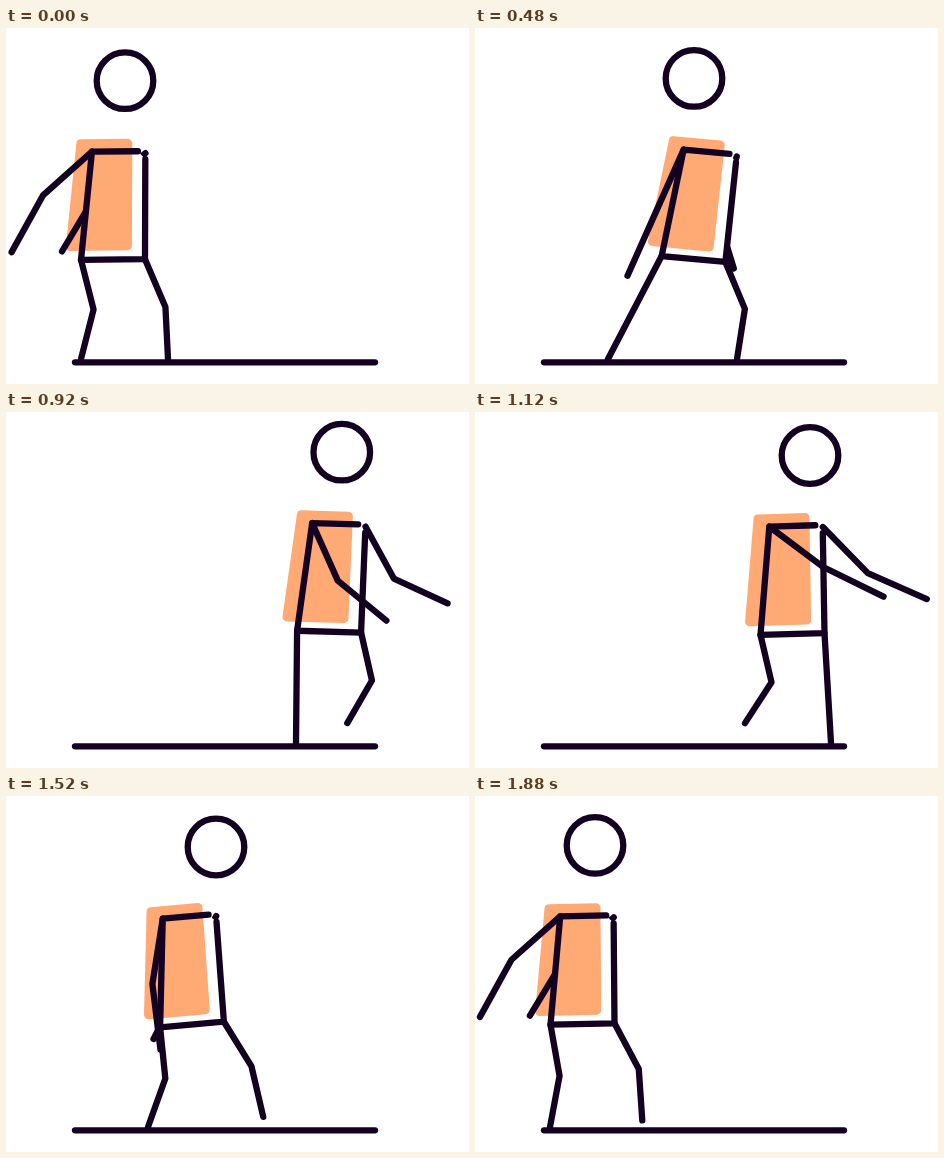
Recreate the animation shown at these times as an HTML page with a canvas. Size 463 by 356 pixels, loop 1.92 s.

```html
<!DOCTYPE html>
<html lang="en">
<head>
<meta charset="utf-8">
<title>Stick figure pacing</title>
<style>
html, body { margin: 0; height: 100%; overflow: hidden; background: #fff; }
canvas { display: block; }
</style>
</head>
<body>
<canvas id="stage" width="463" height="356"></canvas>
<script>
const ctx = document.getElementById('stage').getContext('2d');
const LOOP = 1920, STEP = 40, FLOOR = 331;
const INK = '#140121', ORANGE = '#ffa974';

// Keys: time, hip centre x, y, head offset x
const body = [
  [0, 107, 231.5, 12], [320, 133, 221.5, 6], [400, 172, 217.5, 3],
  [480, 218.5, 231, .5], [720, 310, 231.5, 8], [1020, 325, 215.5, 15],
  [1120, 317.5, 222, 17.5], [1520, 186, 228.5, 24], [1880, 107.5, 228, 12.5]
];
// Keys: time, swing in degrees from hanging, reach from shoulder to hand
const nearArm = [
  [320, -23.3, 139], [480, -24, 138], [720, 3.6, 111],
  [1120, 58.5, 134], [1520, -1, 131], [1900, -38.8, 128.5]
];
const farArm = [
  [320, -16.3, 128], [480, -1.5, 112], [720, 30, 102],
  [1120, 55.3, 126.5], [1520, -27, 138], [1900, -40.5, 129]
];
// Steps: lift time, landing time, landing x
const nearSteps = [[120, 300, 133], [490, 710, 290], [1060, 1320, 142], [1560, 1840, 75]];
const farSteps = [[240, 480, 262], [740, 980, 356], [1270, 1460, 262], [1490, 1680, 191], [1800, 1910, 162]];

// Looping monotone cubic interpolation of every column of a track
function sample(track, t) {
  const n = track.length;
  const time = i => track[(i + n) % n][0] + Math.floor(i / n) * LOOP;
  const val = (i, c) => track[(i + n) % n][c];
  const slope = (i, c) => (val(i + 1, c) - val(i, c)) / (time(i + 1) - time(i));
  const tangent = (i, c) => {
    const a = slope(i - 1, c), b = slope(i, c);
    return a * b > 0 ? 2 * a * b / (a + b) : 0;
  };
  let i = n - 1;
  while (time(i) > t) i--;
  const h = time(i + 1) - time(i), u = (t - time(i)) / h, v = 1 - u;
  return track[0].slice(1).map((_, k) => {
    const c = k + 1;
    return val(i, c) * v * v * (1 + 2 * u) + val(i + 1, c) * u * u * (3 - 2 * u)
      + h * u * v * (tangent(i, c) * v - tangent(i + 1, c) * u);
  });
}

// Each step eases sideways and lifts in an arc; short steps lift less
function foot(steps, t) {
  let x = steps[steps.length - 1][2], y = FLOOR;
  for (const [start, end, to] of steps) {
    const p = Math.min(1, Math.max(0, (t - start) / (end - start)));
    y -= Math.sin(Math.PI * p) * Math.min(30, .3 * Math.abs(to - x));
    x += (to - x) * p * p * (3 - 2 * p);
  }
  return [x, y];
}

function path(points, close) {
  points.forEach(([x, y], i) => i ? ctx.lineTo(x, y) : ctx.moveTo(x, y));
  if (close) ctx.closePath();
}

function line(...points) {
  ctx.beginPath();
  path(points);
  ctx.stroke();
}

// The joint bulges sideways as the limb gets shorter than its full length
function limb([x, y], [endX, endY], length, flex) {
  const dx = endX - x, dy = endY - y, d = Math.hypot(dx, dy);
  const bend = flex * Math.sqrt(Math.max(0, length * length - d * d)) / d;
  line([x, y], [x + dx / 2 + bend * dy, y + dy / 2 - bend * dx], [endX, endY]);
}

function leg(hip, steps, t) {
  limb(hip, foot(steps, t), 106, .336);
}

function arm([x, y], track, t) {
  const [swing, reach] = sample(track, t), a = swing * Math.PI / 180;
  limb([x, y], [x + reach * Math.sin(a), y + reach * Math.cos(a)], 136.5, -.24);
}

function draw(t) {
  const [cx, cy, headX] = sample(body, t);
  const lean = .2 + 5.2 * Math.sin(2 * Math.PI * (t - 45) / LOOP);
  const a = lean * Math.PI / 180, cos = Math.cos(a), sin = Math.sin(a);
  const place = (x, y) => [cx + x * cos - y * sin, cy + x * sin + y * cos];
  const hipL = place(-32, 0), hipR = place(32, 0), shoulder = place(-20, -108);
  const torso = [place(26, -108), shoulder, hipL, hipR, place(33.3, -100)];

  ctx.fillStyle = '#fff';
  ctx.fillRect(0, 0, 463, 356);
  ctx.lineCap = ctx.lineJoin = 'round';

  // Backpack
  ctx.fillStyle = ctx.strokeStyle = ORANGE;
  ctx.lineWidth = 9;
  ctx.beginPath();
  path([place(-31, -116), place(16, -116), place(14.5, -13.5), place(-42.5, -13.5)], true);
  ctx.fill();
  ctx.stroke();

  ctx.strokeStyle = INK;
  ctx.lineWidth = 6.3;

  // The far arm is hidden behind the torso
  ctx.save();
  ctx.beginPath();
  ctx.rect(0, 0, 463, 356);
  path(torso, true);
  ctx.clip('evenodd');
  arm(place(33.5, -106), farArm, t);
  ctx.restore();

  leg(hipR, farSteps, t);
  leg(hipL, nearSteps, t);
  line(...torso);
  arm(shoulder, nearArm, t);

  ctx.beginPath();
  ctx.arc(cx + headX, cy - 179 - lean * .3, 28.3, 0, 2 * Math.PI);
  ctx.stroke();
  line([69, 334.3], [369, 334.3]);
}

function tick() {
  draw(Math.floor(performance.now() / STEP) * STEP % LOOP);
  requestAnimationFrame(tick);
}
tick();
</script>
</body>
</html>
```
